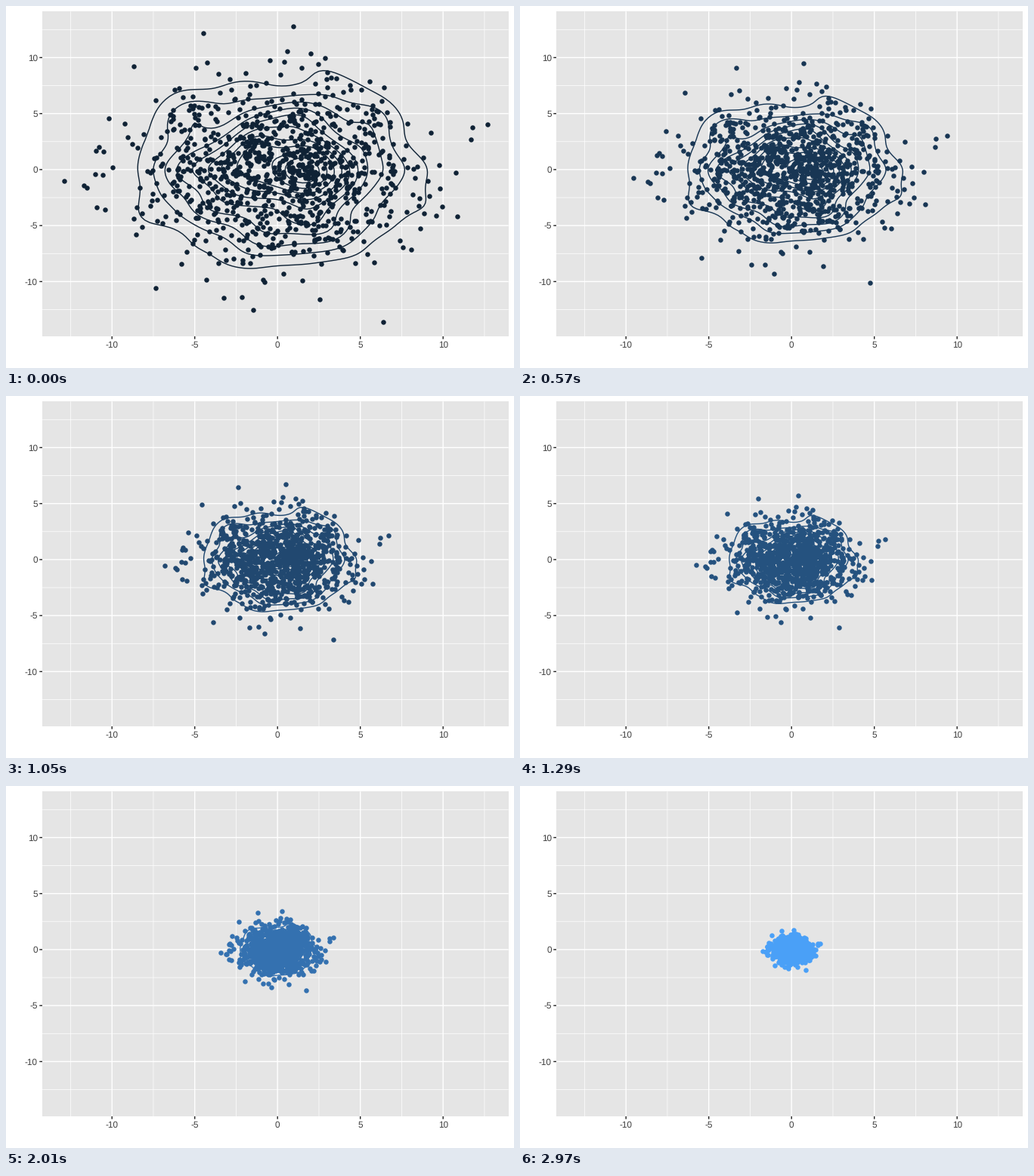
Recreate the animation shown at these times as a matplotlib script. Size 672 by 480 pixels, loop 3 s.

```python
import numpy as np
import matplotlib.pyplot as plt
from matplotlib.animation import FuncAnimation
from matplotlib.collections import LineCollection

W, H, DPI = 672, 480, 96
FRAMES, STEP = 100, 30
PX = 72 / DPI                      # points per pixel
LEFT, RIGHT, TOP, BOTTOM = 48, 664.7, 7.3, 438
CENTER = np.array([359.2, 216.9])
UNIT = np.array([21.9, -14.85])

COUNT, SIGMA, REACH = 1000, 4, 10.8
ROUNDS, SHRINK = 20, 0.9

DARK = np.array([15, 34, 53]) / 255
LIGHT = np.array([74, 160, 247]) / 255
DIP = np.array([3.5, 7, 10]) / 255

# the few points that stand clear of the cloud
FAR = [
    (0.95, 12.8), (-4.5, 12.2), (-8.7, 9.25), (-10.2, 4.6), (-10.8, 2),
    (-10.95, 1.7), (-11, -0.4), (-12.9, -1), (-11.7, -1.45), (-11.5, -1.65),
    (-10.9, -3.35), (-10.4, -3.6), (-7.35, -10.6), (-3.25, -11.45),
    (-2.15, -11.4), (-1.45, -12.5), (2.55, -11.6), (6.4, -13.6),
    (10.85, -4.15), (10.75, -0.25), (11.7, 2.7), (11.75, 3.75), (12.67, 4.05),
]


def to_px(points):
    return CENTER + np.asarray(points) * UNIT


def make_cloud():
    rng = np.random.default_rng(11)
    pts = rng.normal(0, SIGMA, (2 * COUNT, 2))
    pts = pts[np.hypot(*pts.T) < REACH]
    return np.vstack([FAR, pts[:COUNT - len(FAR)]])


def density_rings(ax, pts):
    """Contours of a Gaussian kernel density estimate."""
    grid = np.linspace(-14, 14, 113)
    h = 1.06 * pts.std(axis=0) * len(pts) ** -0.2
    kx, ky = (np.exp(-((grid[:, None] - pts[:, k]) / h[k]) ** 2 / 2)
              for k in (0, 1))
    z = ky @ kx.T / (2 * np.pi * h.prod() * len(pts))
    cs = ax.contour(grid, grid, z, levels=np.arange(1, 12) * 0.001)
    rings = [seg for level in cs.allsegs for seg in level if len(seg) > 2]
    cs.remove()
    return rings


def spread(u):
    """Linear moves between rounds; the first round holds still."""
    rounds = np.arange(ROUNDS + 1)
    return np.interp(u * ROUNDS, rounds, SHRINK ** np.maximum(rounds - 1, 0))


def shade(u):
    return np.clip(DARK + (LIGHT - DARK) * u - 4 * u * (1 - u) * DIP, 0, 1)


def draw_axes(ax):
    ax.add_patch(plt.Rectangle((LEFT, TOP), RIGHT - LEFT, BOTTOM - TOP,
                               fc="#e5e5e5", ec="none", zorder=0))
    base = dict(zorder=1, solid_capstyle="butt", snap=False)
    text = dict(family="Liberation Sans", size=8.8, color="#404040",
                va="baseline")
    for v in np.arange(-12.5, 13, 2.5):
        x, y = to_px((v, v))
        major = v % 5 == 0
        line = dict(base, color="white", lw=(1.42 if major else 0.71) * PX)
        ax.plot([x, x], [TOP, BOTTOM], **line)
        ax.plot([LEFT, RIGHT], [y, y], **line)
        if major:
            tick = dict(base, color="#262626", lw=1.42 * PX)
            ax.plot([x, x], [BOTTOM, BOTTOM + 3.7], **tick)
            ax.plot([LEFT - 3.7, LEFT], [y, y], **tick)
            ax.text(x, 453.2, f"{v:.0f}", ha="center", **text)
            ax.text(41.7, y + 4.2, f"{v:.0f}", ha="right", **text)


plt.rcParams["text.hinting"] = "none"
fig = plt.figure(figsize=(W / DPI, H / DPI), dpi=DPI, facecolor="white")
ax = fig.add_axes([0, 0, 1, 1])
cloud = make_cloud()
rings = density_rings(ax, cloud)
draw_axes(ax)
ax.set_xlim(0, W)
ax.set_ylim(H, 0)
ax.axis("off")

dots = ax.scatter(*to_px(cloud).T, s=(6.5 * PX) ** 2, lw=0, zorder=2)
lines = LineCollection([], linewidths=1.42 * PX, zorder=3)
ax.add_collection(lines, autolim=False)


def update(i):
    u = i / (FRAMES - 1)
    s, color = spread(u), shade(u)
    dots.set_offsets(to_px(cloud * s))
    dots.set_facecolor(color)
    lines.set_segments([to_px(ring * s) for ring in rings])
    lines.set_color(color)
    return dots, lines


anim = FuncAnimation(fig, update, frames=FRAMES, interval=STEP,
                     repeat=True, repeat_delay=0, blit=False)
plt.show()
```
